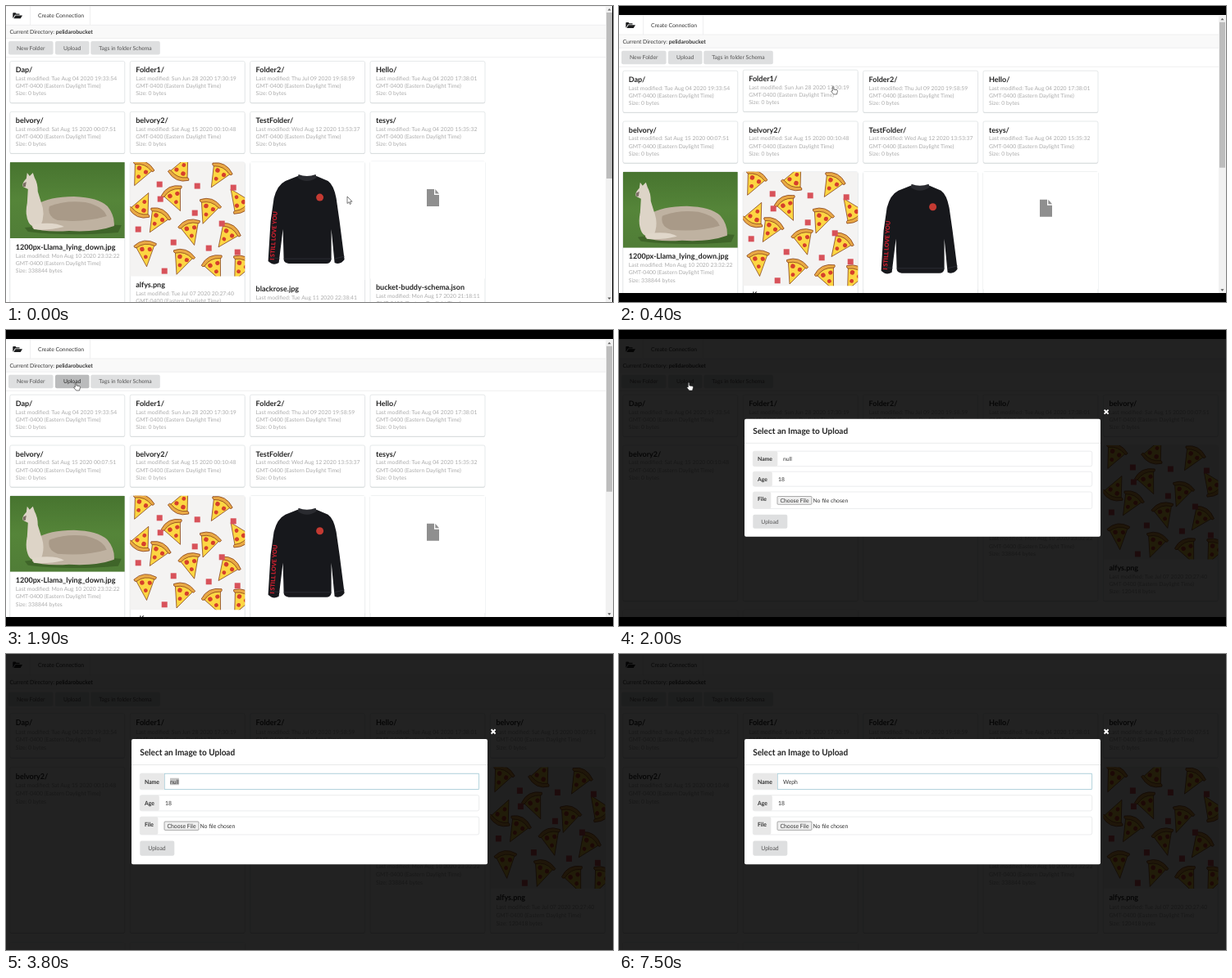
Write an HTML page that moves like this. It is 740 px wide and 362 px high and loops after 8000 ms.

```html
<!DOCTYPE html>
<html lang="en">
<head>
<meta charset="utf-8">
<title>File browser upload</title>
<style>
  html, body { margin: 0; width: 100%; height: 100%; overflow: hidden; background: #000; }
  svg { display: block; }
  text { font: 6.8px Lato, sans-serif; fill: #333; text-rendering: geometricPrecision; white-space: pre; }
  .bold { font-weight: 700; }
  .title { font-size: 9px; font-weight: 700; fill: #222; }
  .heading { font-size: 10px; font-weight: 700; fill: #222; }
  .meta { fill: #acacac; }
  .button rect { fill: #dedfe0; }
  .button text { fill: #555; }
  .button.hover rect { fill: #babbbc; }
  .button.hover text { fill: #222; }
  .card.hover { transform: translateY(-1px); }
  .sleeve { font-size: 7.3px; font-weight: 900; fill: #c8202f; }
</style>
</head>
<body>
<svg id="stage" width="740" height="362" viewBox="0 0 740 362"></svg>
<script>
const LOOP = 8000, FRAME = 100, BAR = 11, FULL = 362, VIEW = FULL - 2 * BAR;
const PAGE_TOP = 11.7;
const stage = document.getElementById('stage');

const rect = (x, y, w, h, fill, extra = '') =>
  `<rect x="${x}" y="${y}" width="${w}" height="${h}" fill="${fill}" ${extra}/>`;
const path = (d, fill, extra = '') => `<path d="${d}" fill="${fill}" ${extra}/>`;
const label = (x, middle, content, cls = '', size = 7) =>
  `<text x="${x}" y="${middle + size * 0.35}" class="${cls}">${content}</text>`;
const button = (x, y, w, h, content) =>
  `<g class="button" data-box="${x},${y},${w},${h}">${rect(x, y, w, h, '#dedfe0', 'rx="2"')}
   ${label(x + 10, y + h / 2, content)}</g>`;

// Pictures, each drawn from its own top left corner.
const llama = () => `
  ${rect(0, 0, 140, 93, 'url(#grass)')}
  ${path('M18 80Q60 73 136 77L132 86Q70 91 22 85Z', '#3f6529')}
  ${path('M32 52Q48 42 78 42Q108 43 119 54Q128 65 127 78Q105 86 72 84Q40 86 27 80Z', '#bfb2a1')}
  ${path('M48 54Q68 46 92 49Q114 54 118 66Q92 74 58 71Q45 66 48 54Z', '#a99a88')}
  ${path('M20 20L21 13L24 17L28 13L30 19Q34 26 34 36L38 49Q44 64 37 79Q27 81 23 74Q18 64 21 50L22 33L16 30Q14 26 20 20Z', '#ddd4c7')}
  ${path('M27 76Q55 72 66 79Q45 84 29 82Z', '#e0d7ca')}
  ${path('M16 26L20 24L19 30L16 30Z', '#7b6e64')}`;

const slices = [
  [14, 13, 20], [62, 8, 200], [109, 16, 25], [55, 43, 330], [14, 53, 200], [96, 59, 15], [132, 48, 140],
  [34, 71, 25], [75, 84, 340], [119, 90, 30], [20, 110, 350], [64, 121, 15], [104, 128, 330], [136, 129, 20]
];
const marks = [[36, 27], [82, 29], [126, 31], [37, 45], [112, 75], [10, 82], [53, 98], [96, 105], [42, 133], [131, 110], [79, 62]];
const pizza = () => rect(0, 0, 140, 140, '#f4f3f2') +
  slices.map(([x, y, turn]) => `<use href="#slice" transform="translate(${x} ${y}) rotate(${turn}) scale(.92)"/>`).join('') +
  marks.map(([x, y]) => rect(x - 3.5, y - 3.5, 7, 7, '#d8525a')).join('');

const shirt = () => rect(0, 0, 140, 144, '#fff') + `
  ${path('M58 17Q69 23 81 17L95 23Q102 28 105 44L109 72L115 119Q110 126 103 123L99 82L99 119Q98 124 93 124L47 124Q41 123 41 119L40 82L35 123Q28 127 22 121L25 72L29 44Q33 28 43 23Z', '#17181c')}
  ${path('M59 15Q69 19 80 15L81 19Q69 27 58 19Z', '#2a2b30')}
  ${path('M41 118H99M23 116L36 118M103 118L115 115', 'none', 'stroke="#30323a" stroke-width=".8"')}
  <circle cx="85" cy="43" r="4.5" fill="#c43a32"/>
  <text class="sleeve" transform="translate(29.5 120) rotate(-86.5)">I STILL LOVE YOU</text>`;

const fileIcon = () => rect(0, 0, 140, 144, '#fff') +
  path('M69 34H78V41H84V55H69Z', '#8f8f8f') + path('M79.3 34L84 39.5H79.3Z', '#8f8f8f');

const items = [
  { name: 'Dap/', date: 'Tue Aug 04 2020 19:33:54' },
  { name: 'Folder1/', date: 'Sun Jun 28 2020 17:30:19' },
  { name: 'Folder2/', date: 'Thu Jul 09 2020 19:58:59' },
  { name: 'Hello/', date: 'Tue Aug 04 2020 17:38:01' },
  { name: 'belvory/', date: 'Sat Aug 15 2020 00:07:51' },
  { name: 'belvory2/', date: 'Sat Aug 15 2020 00:10:48' },
  { name: 'TestFolder/', date: 'Wed Aug 12 2020 13:53:37' },
  { name: 'tesys/', date: 'Tue Aug 04 2020 15:35:32' },
  { name: '1200px-Llama_lying_down.jpg', date: 'Mon Aug 10 2020 23:32:22', size: 338844, art: llama, tall: 93 },
  { name: 'alfys.png', date: 'Tue Jul 07 2020 20:27:40', size: 120418, art: pizza, tall: 139.5 },
  { name: 'blackrose.jpg', date: 'Tue Aug 11 2020 22:38:41', size: 48210, art: shirt, tall: 144 },
  { name: 'bucket-buddy-schema.json', date: 'Mon Aug 17 2020 21:18:11', size: 512, art: fileIcon, tall: 143.5 }
];

function card({ name, date, size = 0, art, tall = 0 }, x, y, h) {
  const top = y + tall;
  return `<g class="card" data-box="${x},${y},140,${h}">
    ${rect(x, y + 0.8, 140, h, '#d3d6d8', 'rx="2"')}
    ${rect(x, y, 140, h, '#fff', 'rx="2" stroke="#d6dadc" stroke-width=".6"')}
    ${art ? `<svg x="${x}" y="${y}" width="140" height="${tall}">${art()}</svg>` : ''}
    ${label(x + 7, top + 10.5, name, 'title', 9)}
    ${label(x + 7, top + 21, 'Last modified: ' + date, 'meta')}
    ${label(x + 7, top + 30.2, 'GMT-0400 (Eastern Daylight Time)', 'meta')}
    ${label(x + 7, top + 39.5, `Size: ${size} bytes`, 'meta')}</g>`;
}

function grid(columns) {
  let out = '', y = 67.5;
  for (let i = 0; i < items.length; i += columns) {
    const row = items.slice(i, i + columns);
    const h = 51 + Math.max(...row.map(item => item.tall || 0));
    out += row.map((item, c) => card(item, 4.8 + c * 146.4, y, h)).join('');
    y += h + 10.8;
  }
  return out;
}

const page = columns => `
  ${rect(0, -1, 740, FULL + 1, '#fff')}
  ${rect(0, 23.5, 740, 16, '#f9f9f9')}
  ${path('M0 .3H740M0 23.3H740M0 39.6H740M0 62.6H740M29.5 0V23M102.5 0V23', 'none', 'stroke="#e4e5e6" stroke-width=".6"')}
  ${path('M8.3 14.5V9Q8.3 8.3 9 8.3H11.6L12.6 9.5H16.5V10.8H11L8.8 14.5ZM9.3 15.3L11.6 11.5H20L17.7 15.3Z', '#1b1c1d')}
  ${label(39, 11.7, 'Create Connection')}
  ${label(4.5, 32, 'Current Directory: <tspan class="bold">pelidarobucket</tspan>')}
  ${button(3, 43, 54.5, 16.5, 'New Folder')}
  ${button(60, 43, 41.5, 16.5, 'Upload')}
  ${button(103.3, 43, 84.5, 16.5, 'Tags in folder Schema')}
  ${grid(columns)}`;

const field = (y, h, name, w, textY = y + h / 2) => `
  ${rect(163.3, y, 413.4, h, '#fff', 'rx="2" stroke="#dfe1e2" stroke-width=".6"')}
  ${rect(163.3, y, w, h, '#e8e8e8', 'rx="2"')}
  ${label(169, textY, name, 'bold')}`;

const modal = `
  ${rect(153, 97, 434, 144, '#fff', 'rx="2"')}
  ${label(163.3, 112.2, 'Select an Image to Upload', 'heading', 10)}
  ${rect(153, 126.2, 434, 0.6, '#dcdddd')}
  ${field(136.5, 18.5, 'Name', 30)}
  ${field(161.5, 18, 'Age', 23.5)}
  ${field(186.3, 20.5, 'File', 22, 195.3)}
  <rect id="focus" x="193.3" y="136.7" width="383.2" height="18" fill="#fff" stroke="#9fc9d6" stroke-width=".7"/>
  <rect id="selection" x="200" y="141.8" height="8" fill="#c4c4c4"/>
  <text id="name" x="200" y="148.2"></text>
  <rect id="caret" y="141.8" width=".7" height="8" fill="#222"/>
  ${label(194, 170.5, '18')}
  ${rect(193, 191.8, 42, 9.8, '#efefef', 'rx="1" stroke="#777" stroke-width=".6"')}
  ${label(196.5, 196.8, 'Choose File')}
  ${label(236.5, 196.8, 'No file chosen')}
  ${button(163.3, 214, 42, 17, 'Upload')}
  ${path('M591.6 85.9L596.6 90.9M596.6 85.9L591.6 90.9', 'none', 'stroke="#fff" stroke-width="1.9"')}`;

stage.innerHTML = `
  <defs>
    <linearGradient id="grass" x2="0" y2="1">
      <stop offset="0" stop-color="#47742f"/><stop offset=".5" stop-color="#558539"/><stop offset="1" stop-color="#507d37"/>
    </linearGradient>
    <g id="slice" stroke="#7a3213" stroke-width=".7" stroke-linejoin="round">
      ${path('M-13 -11Q0 -17 13 -9L-3 19Z', '#fcd643')}
      ${path('M-15 -11Q0 -21 15 -9Q14 -5 11 -7Q0 -14 -12 -8Q-15 -8 -15 -11Z', '#e9a945')}
      <g fill="#d6402b" stroke="none"><circle cx="-5" cy="-5" r="3"/><circle cx="5" cy="-3" r="2.8"/><circle cx="-2" cy="6" r="2.6"/></g>
    </g>
  </defs>
  ${rect(0, 0, 740, FULL, '#000')}
  <g id="screen">
    <g id="browse">${page(4)}
      ${rect(731, 0, 9, FULL, '#f1f1f1')}
      <rect id="thumb" x="732" y="8" width="7" fill="#bdbdbd"/>
      ${path('M733.5 5.5L735.5 3L737.5 5.5Z', '#666')}
      <path id="down" d="M733.5 -5.5L735.5 -3L737.5 -5.5Z" fill="#555"/>
    </g>
    <g id="dialog">${page(5)}${rect(0, -1, 740, FULL + 1, '#000', 'opacity=".865"')}${modal}</g>
  </g>
  <g id="bars">${rect(0, 0, 740, BAR, '#000')}${rect(0, FULL - BAR, 740, BAR, '#000')}</g>
  <g id="edge">${rect(739, 0, 1, FULL, '#000')}</g>
  <g id="pointer">
    <g id="arrow">${path('M0 0V8.5L2 6.7L3.3 9.5L4.6 8.9L3.4 6.2H6Z', '#fff', 'stroke="#222" stroke-width=".6"')}</g>
    <g id="hand">${path('M1.3 6V.9Q2 -.3 2.8 .9V4L6.8 4.8Q7.6 5 7.4 6.5L6.5 10H2.6L-.2 6.6Q-.4 5.2 1.3 6Z', '#fff', 'stroke="#222" stroke-width=".6"')}</g>
    <g id="beam">${path('M-1.7 -4.3H1.7M0 -4.3V4.3M-1.7 4.3H1.7', 'none', 'stroke="#222" stroke-width=".7"')}</g>
  </g>`;

const el = Object.fromEntries([...stage.querySelectorAll('[id]')].map(node => [node.id, node]));
const targets = [...el.browse.querySelectorAll('[data-box]')].map(node => ({ node, box: node.dataset.box.split(',').map(Number) }));
const show = (node, on) => node.setAttribute('visibility', on ? 'inherit' : 'hidden');

// time, x, y
const route = [[0, 416, 233], [400, 259, 98], [800, 160, 79], [1100, 112, 70], [1400, 85, 65], [1700, 83, 64], [2000, 83, 64], [2700, 197, 160], [LOOP, 197, 160]];
const shapes = [[0, 'arrow'], [100, 'hand'], [2100, 'arrow'], [2600, 'beam'], [3500, '']];
const typing = [[0, 'null'], [6000, 'W'], [6300, 'We'], [6400, 'Wep'], [6900, 'Weph']];

const current = (steps, t) => steps.filter(([at]) => at <= t).pop()[1];

function along(t) {
  const i = route.findIndex(([at]) => at > t);
  const [t0, x0, y0] = route[i - 1], [t1, x1, y1] = route[i];
  const k = (t - t0) / (t1 - t0);
  return [x0 + (x1 - x0) * k, y0 + (y1 - y0) * k];
}

function draw(t) {
  const start = t < 100, stretched = t >= 3100, open = t >= 2000;
  const offset = start ? 0 : PAGE_TOP, height = start ? FULL : VIEW;
  el.screen.setAttribute('transform', stretched
    ? `scale(1 ${FULL / VIEW}) translate(0 ${PAGE_TOP - BAR})`
    : `translate(0 ${offset})`);
  show(el.bars, !start && !stretched);
  show(el.edge, start);
  show(el.browse, !open);
  show(el.dialog, open);
  el.thumb.setAttribute('height', start ? 203 : 178);
  el.down.setAttribute('transform', `translate(0 ${height})`);

  const [x, y] = along(t);
  const shape = current(shapes, t);
  el.pointer.setAttribute('transform', `translate(${x} ${y})`);
  for (const id of ['arrow', 'hand', 'beam']) show(el[id], id === shape);
  targets.forEach(({ node, box: [left, top, w, h] }, i) => {
    const inside = x >= left && x <= left + w && y - offset >= top && y - offset <= top + h;
    // The pointer has just left the last card when the loop begins.
    node.classList.toggle('hover', start ? i === targets.length - 1 : inside);
  });

  el.name.textContent = current(typing, t);
  const width = el.name.getComputedTextLength();
  show(el.focus, open && stretched);
  show(el.selection, t >= 3500 && t < 6000);
  el.selection.setAttribute('width', width);
  show(el.caret, t >= 6000 && t < 7500);
  el.caret.setAttribute('x', 200 + width);
}

const origin = performance.now();
function tick() {
  const t = (performance.now() - origin) % LOOP;
  draw(Math.floor(t / FRAME) * FRAME);
  requestAnimationFrame(tick);
}
draw(0);
tick();
</script>
</body>
</html>
```
